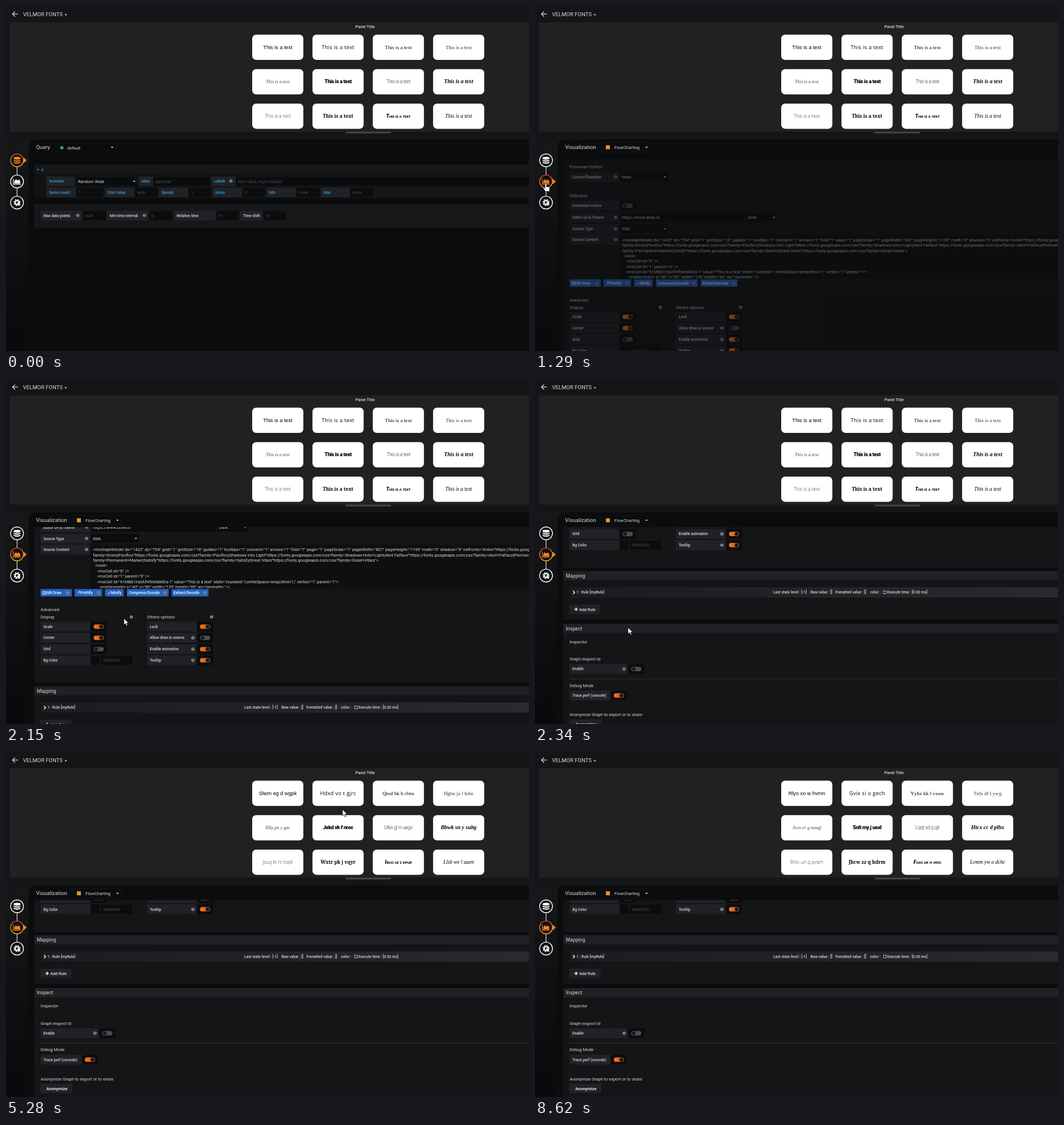
Write an HTML page that moves like this. It is 922 px wide and 608 px high and loops after 9.69 s.

```html
<!DOCTYPE html>
<html lang="en">
<head>
<meta charset="utf-8">
<title>Panel editor</title>
<style>
html, body { margin: 0; width: 100%; height: 100%; overflow: hidden; background: #141517; }
svg { display: block; width: 922px; height: 608px; font-family: Roboto, sans-serif; }
text { white-space: pre; }
</style>
</head>
<body>
<svg id="stage" viewBox="0 0 922 608"></svg>
<script>
const LOOP = 9690;
const INK = '#d8d9da', BLUE = '#33a2e5', LABEL = '#212226', FIELD = '#0b0c0e', DIM = '#4c4d50';
const stage = document.getElementById('stage');

// Drawing helpers; a text's y is the middle of its line.
const esc = s => s.replace(/&/g, '&amp;').replace(/</g, '&lt;');
const rect = (x, y, w, h, fill, more = '') =>
  `<rect x="${x}" y="${y}" width="${w}" height="${h}" fill="${fill}" ${more}/>`;
const path = (d, fill, more = '') => `<path d="${d}" fill="${fill}" ${more}/>`;
const text = (s, x, y, size = 7.5, fill = INK, more = '') =>
  `<text x="${x}" y="${y + size * .36}" font-size="${size}" fill="${fill}" ${more}>${esc(s)}</text>`;
const bold = (s, x, y, fill = INK) => text(s, x, y, 6.6, fill, 'font-weight="500"');
const info = (x, y) => `<circle cx="${x}" cy="${y}" r="2.8" fill="#8e8f92"/>` +
  rect(x - .5, y - .5, 1, 2.2, '#202226') + rect(x - .5, y - 1.8, 1, .9, '#202226');
const caret = (x, y, fill = INK) => path(`M${x - 2.3} ${y - 1}h4.6l-2.3 2.4z`, fill);
const field = (s, x, y, w, fill = DIM) =>
  rect(x + .3, y - 8.4, w - .6, 16.8, FIELD, 'stroke="#1c1d20" stroke-width=".6"') + text(s, x + 4, y, 7.5, fill);
const label = (s, x, y, w, fill = INK) => rect(x, y - 8.6, w, 17.2, LABEL) + bold(s, x + 5, y, fill);
const select = (s, x, y, w) => field(s, x, y, w, INK) + caret(x + w - 6, y);

function toggle(x, y, on) {
  const left = x + 5, knob = on ? left + 13.5 : left + 4.5;
  return rect(x, y - 8.4, 28, 16.8, FIELD) +
    rect(left, y - 3.9, 18, 7.8, on ? 'url(#flame)' : '#4d4e52', 'rx="3.9"') +
    `<circle cx="${knob}" cy="${y}" r="3.6" fill="#17181b" stroke="${on ? '#8a3f1a' : '#4d4e52'}" stroke-width=".8"/>`;
}

function icon(kind, y, active) {
  const c = active ? '#f2831f' : '#fff';
  const art = {
    data: [-3.5, 0, 3.5].map(d =>
      path(`M13.5 ${y + d - 1}q6 2.6 12 0v2.1q-6 2.8-12 0z`, c)).join('') +
      `<ellipse cx="19.5" cy="${y - 4.4}" rx="6" ry="1.9" fill="${c}"/>`,
    chart: path(`M13 ${y - 5}v10h13`, 'none', `stroke="${c}" stroke-width="1.2"`) +
      path(`M14.6 ${y + 3.6}v-4l3-3.6 2.6 2.6 2.5-2.2 2.4 3.4v3.8z`, c),
    gear: `<circle cx="19.5" cy="${y}" r="4.4" fill="none" stroke="${c}" stroke-width="3.2" stroke-dasharray="2 1.45"/>` +
      `<circle cx="19.5" cy="${y}" r="3.2" fill="none" stroke="${c}" stroke-width="1.8"/>` +
      path(`M20 ${y}l5 5`, 'none', `stroke="${c}" stroke-width="1.6"`)
  }[kind];
  return (active ? path(`M31 ${y - 5}l5.5 5-5.5 5z`, c) : '') +
    `<circle cx="19.5" cy="${y}" r="11.3" fill="#101113" stroke="${active ? 'url(#ring)' : '#fff'}" stroke-width="1.4"/>` + art;
}

const sideIcons = active => ['data', 'chart', 'gear']
  .map((k, i) => icon(k, 272 + 37.2 * i, k === active)).join('');

// Sample cards, one type style each.
const SERIF = 'Liberation Serif, serif', SANS = 'Liberation Sans, sans-serif';
const cardStyles = [
  `font: 9.2px ${SANS}`,
  'font: 9.2px Open Sans, sans-serif; letter-spacing: .35px',
  `font: 9.2px ${SERIF}`,
  `font: 9px ${SERIF}; fill: #333`,
  `font: italic 8.2px ${SERIF}; fill: #444`,
  'font: 900 9.2px Roboto, sans-serif; letter-spacing: -.4px',
  'font: 300 8.6px Roboto, sans-serif; letter-spacing: -.4px; fill: #333',
  `font: italic 700 9.8px ${SERIF}`,
  'font: 300 8.3px Open Sans, sans-serif; fill: #333',
  'font: 900 8.4px Noto Serif, serif',
  'font: italic 900 9.2px Lato, sans-serif; font-variant: small-caps',
  `font: italic 9.3px ${SERIF}`
];

function scramble(seed) {
  const letter = () => {
    seed = (seed * 16807) % 2147483647;
    return String.fromCharCode(97 + seed % 26);
  };
  return 'Xxxx xx x xxxx'.replace(/\w/g, c => c === 'X' ? letter().toUpperCase() : letter());
}

const wordings = [
  [0, Array(12).fill('This is a text')],
  [4530, ['Slwm eg d wgpk', 'Hdxd vo t gjrc', 'Qtod bk b rfms', 'Hgbn jx l hdre',
    'Xlky pn y gac', 'Jekd vk f nroc', 'Utks gl m axgo', 'Bbwk sn y subg',
    'Jsuq kt m bqdi', 'Wxtr pk j vqyr', 'Ibuo ae z dpub', 'Llsb we l auen']],
  [7190, cardStyles.map((_, i) => scramble(4021 + 977 * i))],
  [7660, ['Rlyo xo w hvmn', 'Gvix si o gech', 'Yyhx kk l vxuw', 'Tnlx df l ywjj',
    'Jxvo er g mmqf', 'Snlt my j uexl', 'Lqqt xd q ojil', 'Htcx cc d plhx',
    'Bnlx un q pvqm', 'Jhcw zz q hdrm', 'Foxs uk h vefg', 'Lvmm yw o dchc']]
];

const cards = cardStyles.map((style, i) => {
  const x = 434 + 106.3 * (i % 4), y = 50.5 + 60.7 * Math.floor(i / 4);
  return rect(x, y, 90.2, 44.5, '#fff', 'rx="7"') +
    `<text class="card" x="${x + 45.1}" y="${y + 25.1}" text-anchor="middle" style="${style}"></text>`;
}).join('');

const frame = rect(0, 0, 922, 608, '#141517') +
  rect(0, 235, 60, 373, 'url(#side)') +
  path('M922 235H52Q40 235 40 250Q40 400 36 480Q33 550 33 608H922z', FIELD) +
  path('M21 14.2H11.5M16 9.6l-4.6 4.6 4.6 4.6', 'none', `stroke="${INK}" stroke-width="1.3"`) +
  text('VELMOR FONTS', 30, 14.2, 9.6) + caret(105.5, 15.6) +
  rect(7, 29, 915, 192.5, '#212124') +
  text('Panel Title', 633, 36.8, 7.2, INK, 'font-weight="500" text-anchor="middle"') +
  cards + rect(598.5, 221.5, 80, 3, '#454649', 'rx="1.5"') +
  path('M19.5 272V346', 'none', 'stroke="#fff" stroke-width="1"');

function queryPage() {
  const row1 = label('Scenario', 71, 309, 50, BLUE) + select('Random Walk', 123, 309, 109) +
    label('Alias', 234, 309, 25, BLUE) + field('optional', 259, 309, 102) +
    label('Labels', 362, 309, 43, BLUE) + info(396.5, 308.5) + field('key=value, key2=value2', 405, 309, 530);
  const row2 = [
    ['Series count', 71, 52, '1', 124, 48], ['Start value', 174, 52, 'auto', 227, 41],
    ['Spread', 269, 52, '1', 322, 41], ['Noise', 364, 52, '0', 417, 41],
    ['Min', 459, 52, 'none', 512, 41], ['Max', 555, 51, 'none', 607, 41]
  ].map(([name, x, w, val, fx, fw]) => label(name, x, 328.5, w, BLUE) + field(val, fx, 328.5, fw)).join('');
  const row3 = [
    ['Max data points', 61, 73, 'auto', 135, 42, 126.5], ['Min time interval', 178, 73, '0', 252, 42, 244],
    ['Relative time', 296, 73, '1h', 370, 41], ['Time shift', 413, 39, '1h', 453, 41]
  ].map(([name, x, w, val, fx, fw, i]) =>
    label(name, x, 369.5, w) + (i ? info(i, 369) : '') + field(val, fx, 369.5, fw)).join('');
  return text('Query', 53, 248.5, 9.6) + field('', 88, 249.5, 107) +
    '<circle cx="98.5" cy="249.8" r="2.8" fill="#3fae49"/>' + text('default', 108, 249.8, 7.5) + caret(187, 249) +
    rect(50, 279.5, 872, 18, '#161719') + rect(50, 297.5, 872, 41, '#111214') +
    caret(56.5, 288.5, BLUE) + text('A', 61.5, 288.7, 7.5, BLUE) +
    rect(648, 320, 274, 17, '#161719') + row1 + row2 +
    rect(50, 349, 872, 41.5, '#161719') + row3 + sideIcons('data');
}

function sourceText() {
  const css = 'https://fonts.googleapis.com/css?family=';
  const font = (name, end = '|') => name + '^' + css + name.replace(/ /g, '+') + end;
  return [
    [0, '<mxGraphModel dx="1422" dy="794" grid="1" gridSize="10" guides="1" tooltips="1" connect="1" arrows="1" fold="1" page="1" pageScale="1" pageWidth="827" pageHeight="1169" math="0" shadow="0" extFonts="' + font('Anton')],
    [0, 'family=Dosis|' + font('Pacifico') + font('Shadows Into Light') + font('Abril Fatface') + 'Permanent Marker^'],
    [0, 'family=Permanent+Marker|' + font('Satisfy') + font('Great Vibes', '">')],
    [1, '<root>'],
    [2, '<mxCell id="0" />'],
    [2, '<mxCell id="1" parent="0" />'],
    [2, '<mxCell id="h1Mbb1HytAfH9lwtbMDa-1" value="This is a text" style="rounded=1;whiteSpace=wrap;html=1;" vertex="1" parent="1">'],
    [3, '<mxGeometry x="40" y="80" width="120" height="60" as="geometry" />']
  ].map(([indent, s], i) => text(s, 153.5 + 3.8 * indent, 412.2 + 9.37 * i, 7.4)).join('');
}

function settingsPage() {
  const box = (y, h) => rect(50, y, 872, h, '#141517');
  const heading = (s, y) => rect(50, y - 8, 872, 16, '#202124') + text(s, 54.5, y, 8.7);
  const button = (x, w, s, tx, extra) => rect(x, 481.7, w, 13, '#2663c0', 'rx="1"') +
    bold(s, tx, 488.4, '#fff') + info(extra, 488.4);
  const option = (s, y, x, on, hint) => label(s, x, y, 87.5) +
    (hint ? info(x + 81, y) : '') + toggle(x + 88.5, y, on);
  const white = 'stroke="#fff" stroke-width=".9"';

  return box(269, 378) + box(653, 86) + box(746, 240) +
    text('Flowchart Edition', 61, 283.3) +
    label('Current flowchart', 61, 301.3, 87.5) + info(142, 301) + select('Main', 149, 301.3, 86) +
    text('Definition', 61, 334.3) + option('Download source', 352, 61, false) +
    label('Editor Url & Theme', 61, 372.7, 87.5) + info(142, 372.5) +
    field('https://www.draw.io', 149, 372.7, 221, INK) + select('Dark', 371.5, 372.7, 56) +
    label('Source Type', 61, 392.7, 87.5) + info(142, 392.5) + select('XML', 149, 392.7, 86) +
    label('Source Content', 61, 412, 87.5) + info(142, 411.7) +
    rect(149, 403.5, 773, 77, '#0e0f11') +
    `<g clip-path="url(#code)">${sourceText()}</g>` +
    button(61, 55, 'Edit Draw', 70, 109) + path('M69 488v3h-4v-5h3M67 489l3-3.4', 'none', white) +
    button(121, 48.5, 'Prettify', 131, 163) + path('M126 490.5l3.6-4.2M127.4 486h2.4v2.4', 'none', white) +
    rect(174.5, 481.7, 33, 13, '#2663c0', 'rx="1"') + bold('Minify', 185, 488.4, '#fff') +
    path('M179.5 488.5l1.5 1.8 2.8-4', 'none', white) +
    button(213, 73.5, 'Compress/Encode', 216.5, 280) + button(292, 65, 'Extract/Decode', 295.5, 350.5) +
    text('Advanced', 61, 518) + text('Display', 61, 530.8) + info(221, 530.8) +
    text('Others options', 248.5, 530.8) + info(362.5, 530.8) +
    option('Scale', 547.8, 61, true) + option('Center', 567.6, 61, true) + option('Grid', 587.6, 61, false) +
    label('Bg Color', 61, 607.2, 87.5) + field('', 149, 607.2, 17) + field('#000000', 167, 607.2, 57) +
    option('Lock', 547.8, 248.5, true) + option('Allow draw.io source', 567.6, 248.5, false, true) +
    option('Enable animation', 587.6, 248.5, true, true) + option('Tooltip', 607.2, 248.5, true, true) +
    heading('Mapping', 661) + rect(62, 681.5, 860, 18, 'url(#rule)') +
    path('M67 687.8l2.8 2.8-2.8 2.8', 'none', 'stroke="#fff" stroke-width="1.4"') +
    bold('1 : Rule [myRule]', 73, 690.6) + bold('Last state level : [-1]', 420, 690.6) +
    bold('Raw value : []', 485.5, 690.6) + bold('Fomatted value : []', 529.5, 690.6) +
    bold('color :', 590.5, 690.6) + bold('Execute time : [0.00 ms]', 621, 690.6) +
    rect(614.4, 688, 4.8, 4.8, 'none', 'stroke="#d8d9da" stroke-width=".8"') +
    rect(60.5, 712, 55, 16.5, LABEL, 'rx="1"') + text('Add Rule', 78, 720.6, 7.2, INK, 'font-weight="500"') +
    path('M69.5 720.3h6M72.5 717.3v6', 'none', 'stroke="#fff" stroke-width="1.5"') +
    heading('Inspect', 754) + text('Inspector', 61, 777.3) + text('Graph inspect Id', 61, 808) +
    label('Enable', 61, 825.6, 102) + info(157, 825.5) + toggle(164.5, 825.6, false) +
    rect(61, 842.6, 861, .8, '#38393c') + text('Debug Mode', 61, 854.6) +
    label('Trace perf (console)', 61, 872.2, 72) + toggle(134, 872.2, true) +
    text('Anonymize Graph to export or to share', 61, 906.2) +
    rect(60, 914.5, 57, 16.5, LABEL, 'rx="1"') + text('Anonymize', 71, 922.8, 7.5, '#fff', 'font-weight="500"');
}

const gradient = (id, dir, from, to) => `<linearGradient id="${id}" x2="${dir === 'x' ? 1 : 0}" y2="${dir === 'x' ? 0 : 1}">
  <stop stop-color="${from}"/><stop offset="1" stop-color="${to}"/></linearGradient>`;

stage.innerHTML = `<defs>
  ${gradient('side', 'y', '#161719', '#08090a')}${gradient('flame', 'x', '#f5791f', '#c9531c')}
  ${gradient('ring', 'y', '#e8472b', '#fbae1c')}${gradient('rule', 'x', '#1b1c1f', '#292a2d')}
  <clipPath id="view"><path d="M40 261H922V608H40z"/></clipPath>
  <clipPath id="code"><path d="M149 404H922V480H149z"/></clipPath></defs>
  ${frame}
  <g id="query">${queryPage()}</g>
  <g id="settings">
    <g clip-path="url(#view)"><g id="content">${settingsPage()}</g></g>
    ${text('Visualization', 53, 248.5, 9.6)}${field('', 118, 249, 86)}
    ${rect(125, 245.5, 7, 7, '#e09a2b')}${text('FlowCharting', 140, 249.3, 7.5)}${caret(196.5, 249)}
    ${sideIcons('chart')}
  </g>
  <g id="cursor" stroke="#000" stroke-width=".7">
    ${path('M0 0v11.2l2.6-2.4 1.8 4.1 1.9-.8-1.8-3.9h3.6z', '#fff', 'id="arrow"')}
    ${path('M-1.3 1.2a1.3 1.3 0 0 1 2.6 0v5l4.6 1q1.4.4 1.2 2l-.8 5.6h-7l-3.8-5.2q-.6-1.7 1-1.5l2.2 1.5z', '#fff', 'id="hand"')}
  </g>`;

// Held progress: the first of n steps shows at t0, the last at t1.
function held(t, t0, t1, n) {
  if (t < t0) return 0;
  if (t >= t1) return 1;
  return (Math.floor((t - t0) / (t1 - t0) * (n - 1) + .08) + 1) / n;
}

// Start, end, steps, then a control point and the place reached.
const moves = [
  [80, 1020, 11, 330, 420, 19, 312],
  [1390, 1670, 4, 110, 350, 208, 422],
  [2240, 2340, 2, 186, 430, 164, 438],
  [2890, 3660, 9, 315, 500, 99, 612],
  [3840, 3940, 2, 94, 605, 89, 598],
  [4330, 4330, 1, 90, 598, 90, 598],
  [4530, 5470, 11, 330, 420, 648, 36],
  [5570, 6520, 11, 330, 250, 93, 595],
  [6620, 6710, 2, 94, 593, 95, 591],
  [7970, 8620, 8, 400, 235, 690, 612]
];

function cursorAt(t) {
  let x = 785, y = 612;
  for (const [t0, t1, n, cx, cy, ex, ey] of moves) {
    if (t < t0) break;
    const p = held(t, t0, t1, n), k = p * p * (3 - 2 * p), q = 1 - k;
    x = q * q * x + 2 * q * k * cx + k * k * ex;
    y = q * q * y + 2 * q * k * cy + k * k * ey;
  }
  return [x, y];
}

const scrollStops = [[2050, 30], [2150, 111.5], [2240, 215], [2340, 314.5], [2430, 330]];
const latest = (list, t, first) => list.reduce((v, [at, next]) => t >= at ? next : v, first);
const $ = id => document.getElementById(id);
const show = (id, on) => $(id).setAttribute('visibility', on ? 'visible' : 'hidden');
const cardTexts = [...document.querySelectorAll('.card')];
let shown;

function draw() {
  const t = performance.now() % LOOP;
  const [x, y] = cursorAt(t);
  const overButton = t > 1200 && y > 584 && x > 60 && x < 117;
  const overIcon = x < 32 && y > 260;
  show('query', t < 1200);
  show('settings', t >= 1200);
  $('content').setAttribute('opacity', Math.min(1, held(t, 1200, 1670, 6) * 1.4));
  $('content').setAttribute('transform', `translate(0 ${-latest(scrollStops, t, 0)})`);
  $('cursor').setAttribute('transform', `translate(${x} ${y})`);
  show('hand', overButton || overIcon);
  show('arrow', !(overButton || overIcon));
  const words = latest(wordings, t);
  if (words !== shown) cardTexts.forEach((el, i) => { el.textContent = words[i]; });
  shown = words;
  requestAnimationFrame(draw);
}
draw();
</script>
</body>
</html>
```
